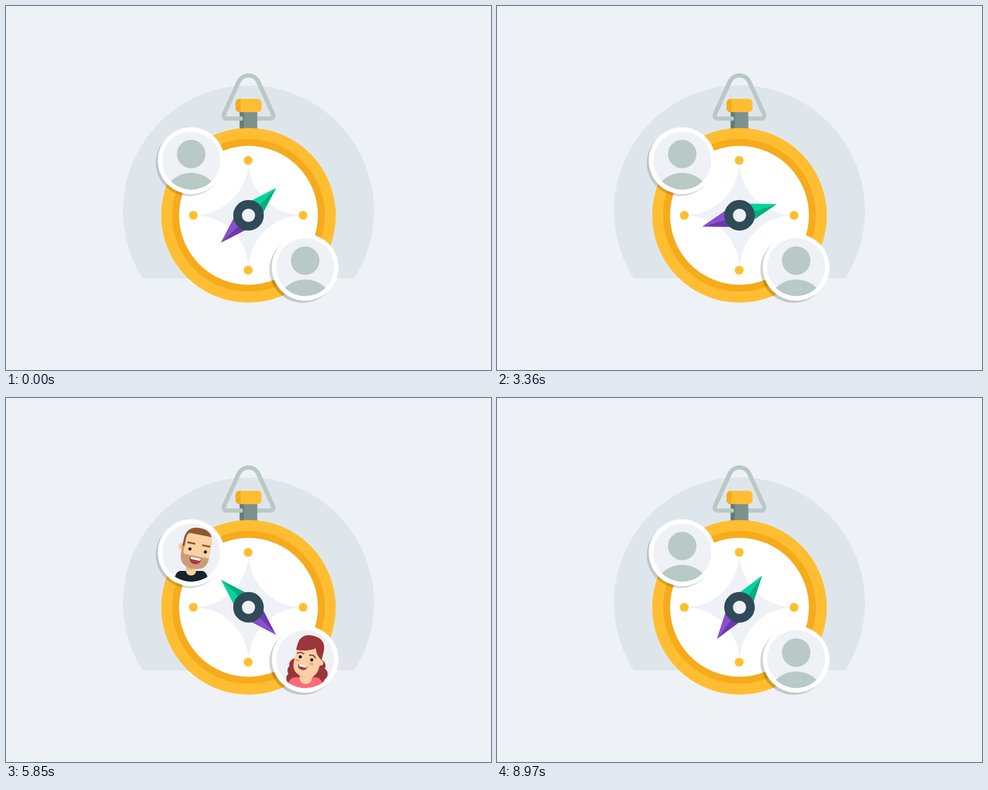
Write an HTML page that moves like this. It is 800 px wide and 600 px high and loops after 9 s.

```html
<!DOCTYPE html>
<html lang="en">
<head>
<meta charset="utf-8">
<title>Compass</title>
<style>
html, body { margin: 0; height: 100%; overflow: hidden; background: #eef2f7; }
svg { display: block; width: 800px; height: 600px; }
.line { fill: none; stroke: #b9c9c5; stroke-width: 7; stroke-linecap: round; }
.brow { fill: none; stroke-width: 3; stroke-linecap: round; }
.gold { fill: #ffbe32; }
.amber { fill: #f5ab1c; }
.pale { fill: #eef1f6; }
.grey { fill: #b9c9c5; }
.skin { fill: #fad0a4; }
.shade { fill: #e9b88c; }
.red { fill: #9b3539; }
.brown { fill: #8c592f; }
.mouth { fill: #a23c48; }
.eye { fill: #1d2023; }
</style>
</head>
<body>
<svg viewBox="0 0 800 600">
  <defs>
    <clipPath id="manClip"><circle cx="305.5" cy="255" r="47.7"/></clipPath>
    <clipPath id="womanClip"><circle cx="493.5" cy="430.5" r="47.7"/></clipPath>
    <g id="person" class="grey">
      <circle cy="-11" r="23.5"/>
      <circle cy="67" r="47"/>
    </g>
  </defs>

  <path d="M225.500 449A207 207 0 1 1 574.500 449Z" fill="#dfe6eb"/>

  <!-- hanger, stem and crown -->
  <path class="line" d="M413 185.500H434Q444 185.500 439.500 176L416.500 125.500C410 110.800 390 110.800 383.500 125.500L360.500 176Q356 185.500 366 185.500H387"/>
  <path d="M385.500 172H414.500V205H385.500Z" fill="#7d928f"/>
  <path d="M385.500 172H392.500V205H385.500Z" fill="#677c79"/>
  <path class="line" d="M368 185.500H387.500"/>
  <rect class="amber" x="378.500" y="153" width="30" height="22" rx="7"/>
  <path class="gold" d="M387 153H414.500Q421.500 153 421.500 160V168Q421.500 175 414.500 175H387Z"/>

  <!-- dial -->
  <circle class="gold" cx="400" cy="345" r="144"/>
  <circle class="amber" cx="400" cy="345" r="126"/>
  <circle cx="400" cy="345" r="114.500" fill="#fff"/>
  <path class="pale" d="M400 255A90 90 0 0 0 490 345A90 90 0 0 0 400 435A90 90 0 0 0 310 345A90 90 0 0 0 400 255Z"/>
  <g class="gold">
    <circle cx="399.500" cy="254.500" r="7.300"/><circle cx="490" cy="345" r="7.300"/>
    <circle cx="399.500" cy="435.500" r="7.300"/><circle cx="309" cy="345" r="7.300"/>
  </g>
  <g id="needle">
    <path d="M0-64.300L-14-20H0Z" fill="#00d49b"/>
    <path d="M0-64.300L14-20H0Z" fill="#00b07d"/>
    <path d="M0 64.300L-14 20H0Z" fill="#8a4ecf"/>
    <path d="M0 64.300L14 20H0Z" fill="#6c39b1"/>
  </g>
  <circle cx="400" cy="345" r="18" fill="#eef2f7" stroke="#2f4a58" stroke-width="14.400"/>

  <!-- man -->
  <circle cx="302" cy="258.500" r="55" opacity=".15"/>
  <circle cx="305.300" cy="255" r="55" fill="#fff"/>
  <circle class="pale" cx="305.500" cy="255" r="47.700"/>
  <g clip-path="url(#manClip)">
    <use href="#person" id="manIcon"/>
    <g id="man">
      <path d="M277 304Q279 285 288 285H323Q332 285 334 304Z" fill="#18222a"/>
      <rect class="skin" x="297" y="270" width="16.500" height="22.500" rx="7.500"/>
      <path class="shade" d="M297 270H313.500V280Q305 286 297 283Z"/>
      <g id="manHead">
        <circle class="skin" cx="280.500" cy="248.500" r="6"/>
        <circle class="shade" cx="281" cy="248.500" r="3"/>
        <path class="skin" d="M281 236Q281 214 304 214Q328 214 328 236V262H281Z"/>
        <path d="M281 246H284.500V256Q285 259.500 288 259.500H328Q328 281 304.500 281Q281 281 281 258Z" fill="#cd9c73"/>
        <path class="brown" d="M281 247V237Q281 213 304.500 213Q320 213 325.500 224H290Q284.500 225 284.500 233V247Z"/>
        <path class="brow" stroke="#8c592f" d="M289 240H300M314 240H325"/>
        <path class="mouth" d="M296.500 262.500H316Q316 273 306.300 273Q296.500 273 296.500 262.500Z"/>
        <path d="M298 262.500H315V264Q315 266 313 266H300Q298 266 298 264Z" fill="#fff"/>
        <ellipse class="eye manEye" cx="294.200" cy="250" rx="2.600" ry="2.600"/>
        <ellipse class="eye manEye" cx="320.200" cy="250" rx="2.600" ry="2.600"/>
      </g>
    </g>
  </g>

  <!-- woman -->
  <circle cx="489.500" cy="434.300" r="55" opacity=".18"/>
  <circle cx="493.400" cy="430.700" r="55" fill="#fff"/>
  <circle class="pale" cx="493.500" cy="430.500" r="47.700"/>
  <g clip-path="url(#womanClip)">
    <use href="#person" id="womanIcon"/>
    <g id="woman">
      <g id="curls" class="red">
        <circle cx="472" cy="440" r="11"/><circle cx="468" cy="449" r="10"/>
        <circle cx="466" cy="462" r="10"/><circle cx="475" cy="464" r="11"/>
        <circle cx="511" cy="441" r="10"/><circle cx="514" cy="455" r="10.500"/>
        <circle cx="509" cy="464" r="10"/>
      </g>
      <path d="M463 480Q466 460.500 477 460.500H511Q521 460.500 525 480Z" fill="#ff6b78"/>
      <rect class="skin" x="484.500" y="448" width="20" height="23.500" rx="9.500"/>
      <path class="shade" d="M484.500 450H504.500V457Q498 462 484.500 460Z"/>
      <g id="womanHead">
        <circle class="skin" cx="515.500" cy="430" r="4.500"/>
        <path class="skin" d="M472 408H515V437Q515 458.500 493.500 458.500Q472 458.500 472 437Z"/>
        <path class="red" d="M471 418.500V412Q471 389.500 493.500 389.500Q516 389.500 516 412V425Q506 421 502 408.500Q491 417 471 418.500Z"/>
        <path class="brow" stroke="#9b3539" style="stroke-width:2" d="M474.500 423.500Q479 419 485 422M495 422Q501 419 505 424"/>
        <g fill="#f6a585">
          <ellipse cx="477.500" cy="434.800" rx="3.800" ry="2.200"/>
          <ellipse cx="501" cy="435.300" rx="3.800" ry="2.200"/>
        </g>
        <path class="mouth" d="M480 440H496Q496 448.500 488 448.500Q480 448.500 480 440Z"/>
        <path d="M481.500 440H495V441.500Q495 443.500 493 443.500H483.500Q481.500 443.500 481.500 441.500Z" fill="#fff"/>
        <ellipse class="eye womanEye" cx="480.500" cy="428.300" rx="2.600" ry="2.600"/>
        <ellipse class="eye womanEye" cx="500" cy="428.500" rx="2.600" ry="2.600"/>
      </g>
    </g>
  </g>
</svg>
<script>
const LOOP = 9000, STEP = 36;

// Key lists: [step, value, step, value, ...]
const needleKeys = [-11.8, -45, 6.2, 78, 10, 77, 39.4, 12, 63, 104, 74, 86,
  84.5, 102, 114, -48, 123, -45, 238.2, -45, 256.2, 78];
const manKeys = {
  icon: [105, 0, 115, 90, 227, 90, 239, 0],
  rise: [113, 90, 127, 0, 214, 0, 226, 90],
  tilt: [131, 0, 146, 11.3, 206, 11.3, 216, 0],
  blink: [162, 1, 168, .1, 174, 1]
};
const womanKeys = {
  icon: [111, 0, 122, 90, 225, 90, 237, 0],
  rise: [122, 90, 135.4, 0, 211, 0, 223, 90],
  tilt: [136, 0, 151, 13.7, 200, 13.7, 211, 0],
  blink: [178, 1, 184, .1, 190, 1]
};

const place = (id, value) => document.getElementById(id).setAttribute('transform', value);

function ease(keys, k) {
  if (k <= keys[0]) return keys[1];
  for (let i = 2; i < keys.length; i += 2) {
    const [k0, a, k1, b] = keys.slice(i - 2, i + 2);
    if (k < k1) return a + (b - a) * (1 - Math.cos(Math.PI * (k - k0) / (k1 - k0))) / 2;
  }
  return keys[keys.length - 1];
}

function pose(name, keys, k, x, y, pivot) {
  const tilt = ease(keys.tilt, k);
  place(name + 'Icon', `translate(${x} ${y + ease(keys.icon, k)})`);
  place(name, `translate(0 ${ease(keys.rise, k)})`);
  place(name + 'Head', `rotate(${tilt} ${pivot})`);
  for (const eye of document.querySelectorAll(`.${name}Eye`))
    eye.setAttribute('ry', 2.6 * ease(keys.blink, k));
  return tilt;
}

function draw(now) {
  const k = Math.floor(now % LOOP / STEP);
  place('needle', `translate(400 345) rotate(${ease(needleKeys, k)})`);
  pose('man', manKeys, k, 305.5, 255, '305 296');
  const tilt = pose('woman', womanKeys, k, 493.5, 430.7, '489.5 448');
  place('curls', `translate(${tilt * .45} 0)`);
  requestAnimationFrame(draw);
}
draw(0);
</script>
</body>
</html>
```
